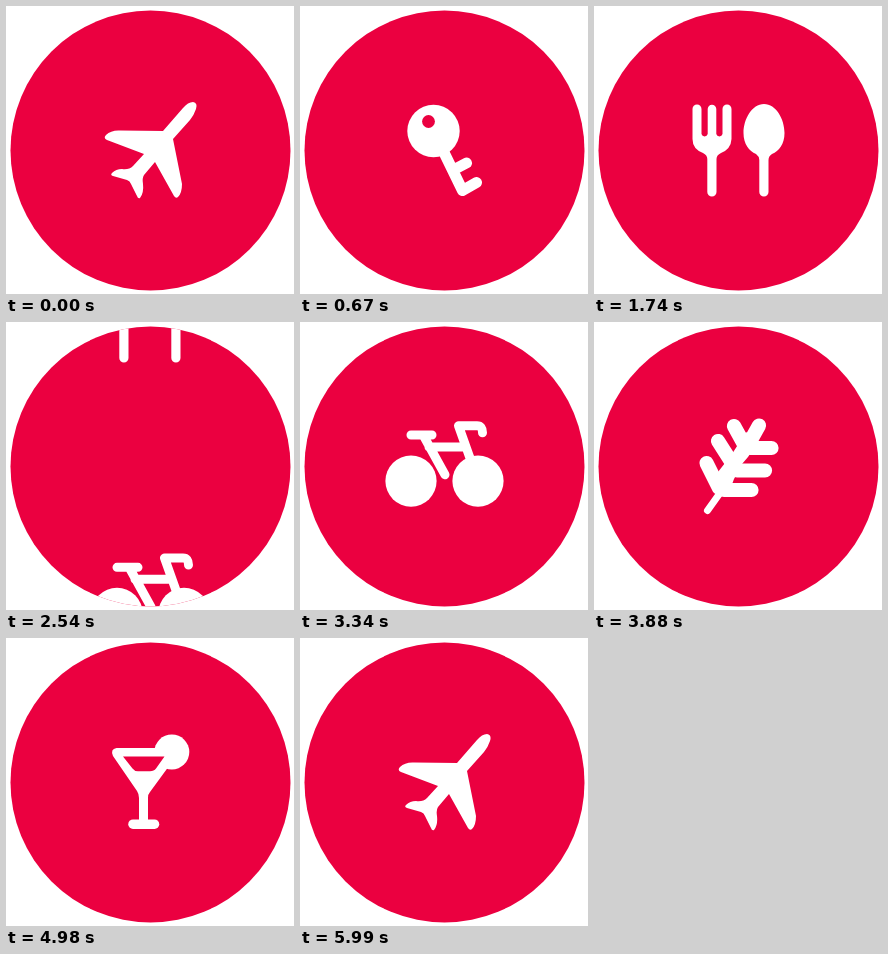
Animation of 288 by 288 pixels, one loop 6490 ms. Source, as an HTML page:

```html
<!DOCTYPE html>
<html lang="en">
<head>
<meta charset="utf-8">
<title>Travel icons</title>
<style>
html, body { margin: 0; width: 100%; height: 100%; overflow: hidden; background: #fff; }
svg { display: block; width: 100%; height: 100%; }
.icon { fill: #fff; stroke: #fff; stroke-width: 0; stroke-linecap: round; stroke-linejoin: round; }
.line { fill: none; }
.hole { fill: #eb0040; }
</style>
</head>
<body>
<svg viewBox="0 0 288 288">
  <defs><clipPath id="disc"><circle cx="144.5" cy="144.5" r="140"/></clipPath></defs>
  <circle class="hole" cx="144.5" cy="144.5" r="140"/>
  <g clip-path="url(#disc)">
    <g class="icon" id="plane">
      <path d="M157 125L177 102Q182 96 187 96Q192 97 190 103Q188 109 184 114L167 133L176 178Q176 187 172 191Q170 193 168 190L149 156L138 169Q136 172 137 178Q138 187 134 192Q132 193 131 190L125 178Q124 175 121 174L107 170Q104 169 106 167Q110 163 116 163Q123 164 127 160L138 148L101 134Q97 132 100 129Q105 124 114 124.500Z"/>
    </g>
    <g class="icon" id="key">
      <circle cx="133.5" cy="125" r="26.200"/>
      <path class="line" stroke-width="11" d="M144 146.500L162.500 184.500L176.500 176.500M157 162L166.500 157"/>
      <circle class="hole" cx="128.5" cy="115.5" r="6.400"/>
    </g>
    <g class="icon" id="cutlery">
      <path d="M98.500 103a4.500 4.500 0 0 1 9 0V128a3.200 3.200 0 0 0 6.200 0V103a4.300 4.300 0 0 1 8.600 0V128a3.200 3.200 0 0 0 6.200 0V103a4.500 4.500 0 0 1 9 0V133Q137 143 127 147Q122.500 149 122.500 153V186a4.600 4.600 0 0 1-9.200 0V153Q113.300 149 109 147Q98.500 143 98.500 133Z"/>
      <path d="M170 98C182 98 190.500 113 190.500 127C190.500 138 185 145 178 148Q174.500 150 174.500 154V186a4.600 4.600 0 0 1-9.200 0V154Q165 150 162 148C155 145 149.500 138 149.500 127C149.500 113 158 98 170 98Z"/>
    </g>
    <g class="icon" id="bike">
      <circle cx="111" cy="161.300" r="25.600"/>
      <circle cx="178" cy="161.300" r="25.600"/>
      <path class="line" stroke-width="9" d="M111 115.300H132M123.500 116L145 155M129 127.300H166M172 144L158.500 106H177Q182.500 106 182.500 113"/>
    </g>
    <g class="icon" id="leaf">
      <path d="M122 173L124 150L138 132L152 110L164 120L154 135L148 142L140 157L134 173Z"/>
      <path class="line" stroke-width="14.200" d="M140 104L151 124M124 119L138 141M112.500 141L125 166M165 103.500L153 125M177.500 126H156M171 148.500H143M157.500 168H130"/>
      <path class="line" stroke-width="7" d="M113.500 188.500L126 171"/>
    </g>
    <g class="icon" id="cocktail">
      <circle cx="165.800" cy="114" r="17.500"/>
      <path d="M110.500 110H163V128L144 154Q142 156 142 160V184H133V160Q133 156 131 153L107 118Q104 111 110.500 110Z"/>
      <path class="line" stroke-width="9.500" d="M127 186.200H148.500"/>
      <path class="hole" d="M117 118.500H158.500L150 130.500Q148 133.300 144 133.300H132Q128.500 133.300 126.500 130.500Z"/>
    </g>
  </g>
</svg>
<script>
const LOOP = 6490, STEP = 30, TRAVEL = 280;
const icons = ["plane", "key", "cutlery", "bike", "leaf", "cocktail"]
  .map(id => document.getElementById(id));
// start time and step count of each upward slide
const slides = [[100, 20], [1170, 20], [2240, 21], [3340, 19], [4380, 21], [5480, 18]];

const ease = p => p * p * (3 - 2 * p);

function position(t) {
  let pos = 0;
  for (const [start, steps] of slides) {
    if (t < start) break;
    pos += ease(Math.min(1, (Math.floor((t - start) / STEP) + 1) / steps));
  }
  return pos;
}

function draw(t) {
  const n = icons.length, pos = position(t);
  icons.forEach((icon, i) => {
    const d = (i - pos + n + 1) % n - 1;
    icon.setAttribute("transform", `translate(0 ${(d * TRAVEL).toFixed(2)})`);
    icon.setAttribute("visibility", Math.abs(d) < 1 ? "visible" : "hidden");
  });
}

const origin = performance.now();
function tick() {
  draw((performance.now() - origin) % LOOP);
  requestAnimationFrame(tick);
}
tick();
</script>
</body>
</html>
```
